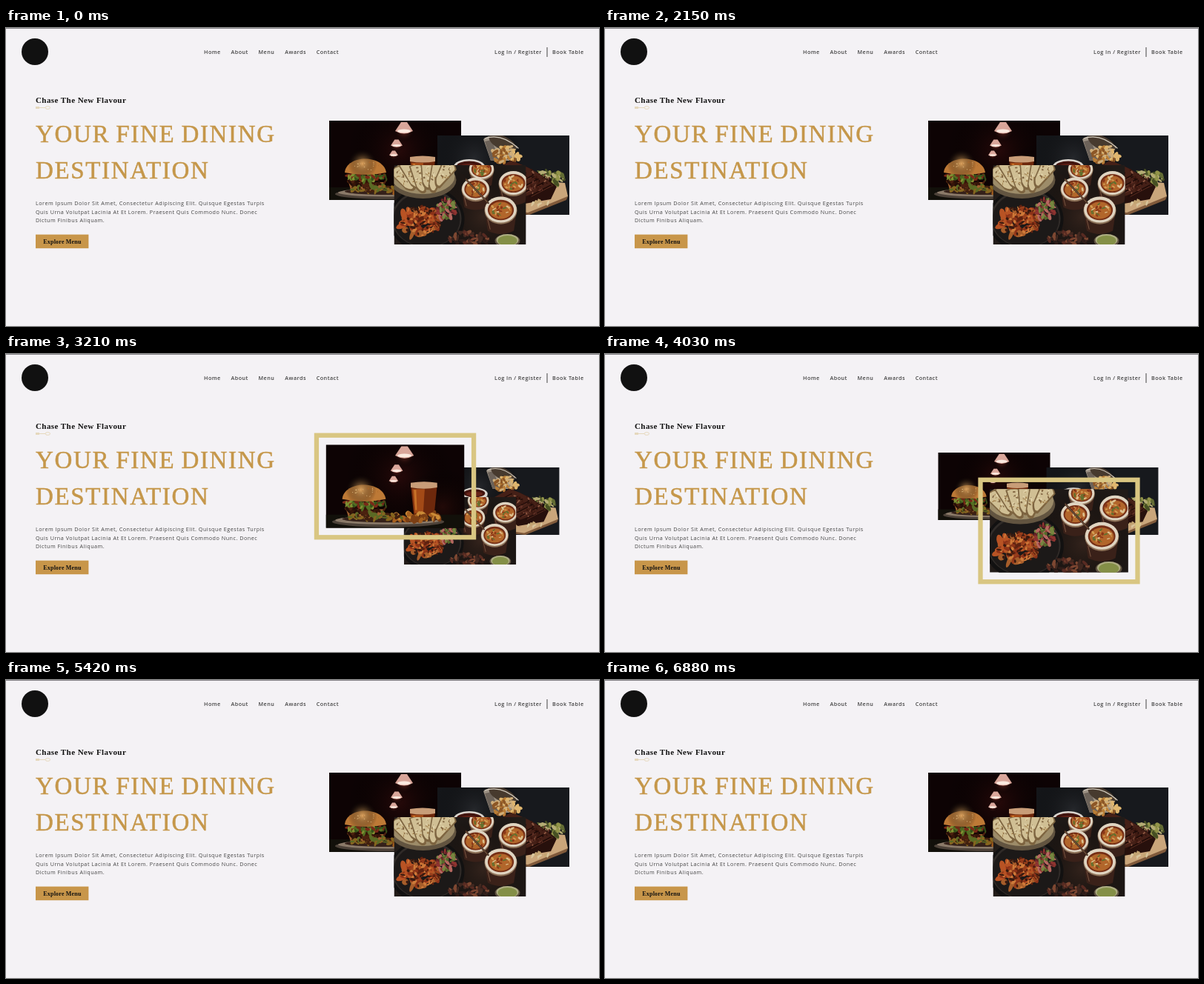
These frames come from a looping animation (800x402 px, 6.91 s). An HTML page with a canvas:

```html
<!DOCTYPE html>
<html lang="en">
<head>
<meta charset="utf-8">
<title>Fine dining</title>
<style>
  html, body { margin: 0; width: 100%; height: 100%; overflow: hidden; background: #f4f2f5; }
  canvas, svg { position: absolute; left: 0; top: 0; width: 800px; height: 402px; }
  .sans { font: 7.2px "Open Sans", "Noto Sans", sans-serif; letter-spacing: .51px; fill: #444; }
  .nav { font-weight: 600; letter-spacing: .48px; fill: #444; }
  .serif { font-family: "Liberation Serif", serif; fill: #111; }
  .tag { font-size: 11px; font-weight: 700; letter-spacing: .43px; }
  .title { font-size: 33px; letter-spacing: 1.65px; word-spacing: -1.7px; fill: #c5974a; stroke: #c5974a; stroke-width: .5px; }
  .button { font-size: 8px; font-weight: 700; letter-spacing: .2px; }
</style>
</head>
<body>
<canvas id="stage" width="800" height="402"></canvas>
<svg viewBox="0 0 800 402">
  <rect width="800" height="1" fill="#858387"/>
  <circle cx="39" cy="32" r="18" fill="#111"/>
  <text class="sans nav" x="267" y="35.3">Home</text>
  <text class="sans nav" x="303.5" y="35.3">About</text>
  <text class="sans nav" x="340.5" y="35.3">Menu</text>
  <text class="sans nav" x="376.3" y="35.3">Awards</text>
  <text class="sans nav" x="418.7" y="35.3">Contact</text>
  <text class="sans nav" x="659" y="35.3">Log In / Register</text>
  <text class="sans nav" x="737" y="35.3">Book Table</text>
  <rect x="729.5" y="26" width="1" height="13" fill="#444"/>
  <text class="serif tag" x="40" y="101">Chase The New Flavour</text>
  <g fill="none" stroke="#e0cda5" stroke-width=".7">
    <path d="M40 107.5h13M40 106.5h5M40 108.5h5"/>
    <ellipse cx="56.3" cy="107.5" rx="3.2" ry="1.9"/>
  </g>
  <text class="serif title" x="40" y="154">YOUR FINE DINING</text>
  <text class="serif title" x="40" y="203">DESTINATION</text>
  <text class="sans" x="40" y="239">Lorem Ipsum Dolor Sit Amet, Consectetur Adipiscing Elit. Quisque Egestas Turpis</text>
  <text class="sans" x="40" y="250.7">Quis Urna Volutpat Lacinia At Et Lorem. Praesent Quis Commodo Nunc. Donec</text>
  <text class="sans" x="40" y="262.4">Dictum Finibus Aliquam.</text>
  <rect x="40" y="278.6" width="71.4" height="18.6" fill="#c8964a"/>
  <text class="serif button" x="50.3" y="290.7">Explore Menu</text>
</svg>
<script>
const ctx = document.getElementById('stage').getContext('2d');
const W = 178, H = 107, LOOP = 6910, FADE = 400;

function random(seed) {
  return () => (seed = (seed * 16807) % 2147483647) / 2147483647;
}

function oval(color, x, y, rx, ry = rx, turn = 0) {
  ctx.fillStyle = color;
  ctx.beginPath();
  ctx.ellipse(x, y, rx, ry, turn, 0, Math.PI * 2);
  ctx.fill();
}

function shape(color, path) {
  ctx.fillStyle = color;
  ctx.fill(new Path2D(path));
}

function stroke(color, width, path) {
  ctx.strokeStyle = color;
  ctx.lineWidth = width;
  ctx.lineCap = 'round';
  ctx.stroke(new Path2D(path));
}

function glow(x, y, r, color) {
  const g = ctx.createRadialGradient(x, y, 0, x, y, r);
  g.addColorStop(0, color);
  g.addColorStop(1, 'transparent');
  ctx.fillStyle = g;
  ctx.fillRect(x - r, y - r, r * 2, r * 2);
}

// Scatters small tilted flecks inside an ellipse.
function scatter(seed, colors, x, y, rx, ry, count, size) {
  const rnd = random(seed * 7919);
  for (let i = 0; i < count; i++) {
    const a = rnd() * Math.PI * 2, d = Math.sqrt(rnd());
    oval(colors[i % colors.length], x + Math.cos(a) * d * rx, y + Math.sin(a) * d * ry,
      size * (.6 + rnd()), size * (.3 + rnd() * .5), rnd() * 3);
  }
}

function burger() {
  ctx.fillStyle = '#0d0304';
  ctx.fillRect(0, 0, W, H);
  glow(95, 40, 70, '#260909');
  glow(150, 80, 50, '#220a08');
  shape('#12100a', 'M0 90H178V107H0Z');
  for (const [x, y, s] of [[101, 11, 1], [91, 31.5, .66], [87, 45, .5]]) {
    glow(x, y + 3 * s, 15 * s, '#6b2821');
    shape('#d9a69a', `M${x - 4 * s} ${y - 9 * s}h${8 * s}l${8 * s} ${12 * s}q${-12 * s} ${7 * s} ${-24 * s} 0Z`);
    oval('#fbeae0', x, y + 3 * s, 9 * s, 2.4 * s);
  }
  oval('#4d4239', 80, 99, 72, 7);
  oval('#8b7a69', 80, 97, 68, 5.5);
  oval('#35211a', 83, 95.5, 62, 4.5);
  shape('#6d280c', 'M109 52H143L139 91H113Z');
  shape('#a34a17', 'M111 57H127L125 88H114Z');
  shape('#c87329', 'M113 58H116L117 84H115Z');
  shape('#c89d78', 'M109 49Q126 46 143 49V55Q126 58 109 55Z');
  shape('#9d602f', 'M26 83H75L72 94Q50 98 29 93Z');
  scatter(4, ['#371509', '#4b210f', '#230e07'], 51, 83, 25, 6, 45, 4);
  scatter(8, ['#536f22', '#7f8f32', '#34501a', '#7a2a18'], 51, 76, 28, 5.5, 60, 3.4);
  shape('#bd7936', 'M21 70C23 46 73 45 77 70Q50 76 21 70Z');
  glow(45, 58, 20, '#dda35e');
  scatter(3, ['#dfb77b', '#a9672b'], 49, 61, 20, 6, 25, .8);
  scatter(11, ['#a6601f', '#cb8b37', '#7c3f14'], 115, 93, 33, 5, 45, 4.2);
  scatter(13, ['#5b6a25', '#86651f', '#41200f'], 65, 92, 36, 4, 40, 3.2);
}

function ribs() {
  ctx.fillStyle = '#17191d';
  ctx.fillRect(0, 0, W, H);
  glow(50, 30, 65, '#25272b');
  shape('#805a3b', 'M2 66L104 105L124 107L174 87L176 82L118 99Z');
  shape('#caa67b', 'M2 64L20 50L172 64L176 82L122 104L101 101Z');
  stroke('#ac845b', .7, 'M16 62L116 94M25 56L125 89');
  shape('#9c9184', 'M62 5Q72 -3 90 2L108 15L97 34L72 34Z');
  shape('#6c6259', 'M64 8L73 6L84 33L72 34Z');
  oval('#473a2e', 88, 10, 20, 9, .45);
  stroke('#d2cabd', 1.2, 'M64 4Q86 -4 109 17');
  scatter(5, ['#b97d36', '#dfb66f', '#8d5726', '#cfae7b'], 93, 27, 18, 13, 60, 3.4);
  oval('#69625d', 43, 47, 21, 10);
  oval('#dbd6cf', 43, 42, 21, 10);
  oval('#42140e', 43, 41, 17, 6.5);
  oval('#682318', 43, 42, 13, 3.6);
  for (let i = 0; i < 10; i++) {
    const x = 12 + (i % 5) * 13, y = 60 + (i % 5) * .8 + (i > 4 ? 11 : 0);
    oval('#96291b', x, y + 1, 10, 7, -.35);
    oval('#cf4a34', x, y, 9, 6, -.35);
    oval('#df7d68', x - 1, y, 5, 2.8, -.35);
  }
  scatter(9, ['#626b34', '#929449', '#464f23', '#b4ac74'], 152, 57, 20, 9, 48, 3.8);
  shape('#27100c', 'M62 57L99 34Q135 46 161 69L153 86L112 93Q88 74 62 57Z');
  shape('#452017', 'M64 53L99 34Q134 45 157 68L116 83Q90 65 64 53Z');
  for (let i = 0; i < 7; i++) {
    const x = 73 + i * 8.5, y = 57 + i * 4.2;
    stroke('#220d09', 2, `M${x} ${y}l29 -15`);
    stroke('#6d3929', .7, `M${x + 3} ${y}l25 -13`);
  }
  scatter(17, ['#623126', '#200c09', '#8b5640', '#3b170f'], 114, 62, 39, 17, 110, 1.7);
  scatter(21, ['#d8c69d', '#c3a573'], 140, 91, 14, 4, 10, 2.8);
}

function bowl(x, y, r) {
  shape('#3a2119', `M${x - r} ${y}L${x - r * .8} ${y + r * 1.3}Q${x} ${y + r * 1.7} ${x + r * .8} ${y + r * 1.3}L${x + r} ${y}Z`);
  stroke('#795440', 1, `M${x - r * .8} ${y + r * .6}L${x - r * .65} ${y + r * 1.2}`);
  oval('#8b7057', x, y + 1.2, r, r * .84);
  oval('#dfd4c1', x, y, r * .97, r * .8);
  oval('#752e15', x, y + .5, r * .8, r * .63);
  oval('#b2662b', x, y + 1, r * .7, r * .52);
  scatter(Math.round(x + y), ['#d39d51', '#8b3618', '#63702e', '#ddc08e'], x, y, r * .62, r * .46, 22, 2.1);
}

function curry() {
  ctx.fillStyle = '#211b18';
  ctx.fillRect(0, 0, W, H);
  glow(120, 70, 80, '#33231c');
  oval('#121111', 44, 73, 51, 44);
  oval('#302b28', 44, 72, 47, 39);
  oval('#1c1918', 44, 73, 45, 37);
  oval('#625440', 39, 20, 45, 25);
  oval('#9d8c69', 39, 15, 43, 24);
  for (let i = 0; i < 6; i++) {
    ctx.save();
    ctx.translate(14 + i * 11, 17 - (i % 2) * 5);
    ctx.rotate(-.65 + i * .24);
    shape('#7d6440', 'M-13 -18Q2 -22 10 -13L4 20Q-2 25 -8 14Z');
    shape('#d0bf94', 'M-11 -17Q2 -20 8 -12L2 17Q-2 21 -7 11Z');
    scatter(31 + i, ['#a48350', '#e2d4ab', '#806441'], -1, -2, 7, 13, 20, 1.4);
    ctx.restore();
  }
  scatter(41, ['#8c3218', '#b85324', '#a65d2a'], 35, 75, 26, 20, 50, 6);
  scatter(43, ['#602210', '#ce7a39', '#983e1b', '#39190f'], 36, 75, 26, 20, 95, 2.5);
  scatter(47, ['#55682b', '#8f3430', '#76853f', '#662327', '#b66860'], 71, 59, 13, 16, 65, 3.1);
  bowl(118, 5, 17);
  bowl(161, 24, 20);
  bowl(110, 32, 19);
  bowl(144, 60, 22);
  stroke('#412b20', 2.5, 'M95 17L127 51');
  stroke('#9a704f', .8, 'M94 16L126 50');
  oval('#1e1714', 93, 16, 3, 5, -.7);
  oval('#5e5140', 153, 102, 17, 9);
  oval('#aead82', 153, 101, 15, 8);
  oval('#848f47', 153, 102, 13, 7);
  scatter(53, ['#582b22', '#412820', '#7d4731', '#301d19'], 101, 99, 28, 9, 50, 3.2);
}

const photos = [
  { x: 525, y: 178.5, paint: burger },
  { x: 671, y: 198.5, paint: ribs },
  { x: 612.5, y: 238.5, paint: curry }
];

const NONE = -1;
const hovers = [
  { at: 0, on: NONE }, { at: 2180, on: 1 }, { at: 2800, on: 0 },
  { at: 3660, on: 2 }, { at: 4900, on: NONE }
];

const mix = (a, b, p) => a + (b - a) * p;
const targetScale = (i, on) => on === NONE ? 1 : on === i ? 1.05 : .85;

// CSS "ease": cubic-bezier(.25, .1, .25, 1)
function ease(x) {
  if (x >= 1) return 1;
  const curve = (s, a, b) => 3 * s * (1 - s) ** 2 * a + 3 * s * s * (1 - s) * b + s ** 3;
  let low = 0, high = 1;
  for (let i = 0; i < 20; i++) {
    const mid = (low + high) / 2;
    if (curve(mid, .25, .25) < x) low = mid; else high = mid;
  }
  return curve(low, .1, 1);
}

function drawOutline(p) {
  const width = 6 * p, gap = 9 + width / 2;
  ctx.strokeStyle = `rgb(${mix(90, 217, p)}, ${mix(90, 198, p)}, ${mix(90, 130, p)})`;
  ctx.lineWidth = width;
  if (width > 0) ctx.strokeRect(-W / 2 - gap, -H / 2 - gap, W + gap * 2, H + gap * 2);
}

function drawPhoto(photo, scale, outline) {
  ctx.save();
  ctx.translate(photo.x, photo.y);
  ctx.scale(scale, scale);
  if (outline !== null) drawOutline(outline);
  ctx.beginPath();
  ctx.rect(-W / 2, -H / 2, W, H);
  ctx.clip();
  ctx.translate(-W / 2, -H / 2);
  photo.paint();
  ctx.restore();
}

function draw(time) {
  const step = hovers.findLastIndex(h => h.at <= time);
  const { at, on } = hovers[step];
  const before = step ? hovers[step - 1].on : NONE;
  const p = ease((time - at) / FADE);
  ctx.clearRect(0, 0, 800, 402);
  const order = [0, 1, 2].filter(i => i !== on);
  if (on !== NONE) order.push(on);
  for (const i of order) {
    const scale = mix(targetScale(i, before), targetScale(i, on), p);
    drawPhoto(photos[i], scale, i === on ? p : null);
  }
}

const start = performance.now();
function tick() {
  draw((performance.now() - start) % LOOP);
  requestAnimationFrame(tick);
}
tick();
</script>
</body>
</html>
```
